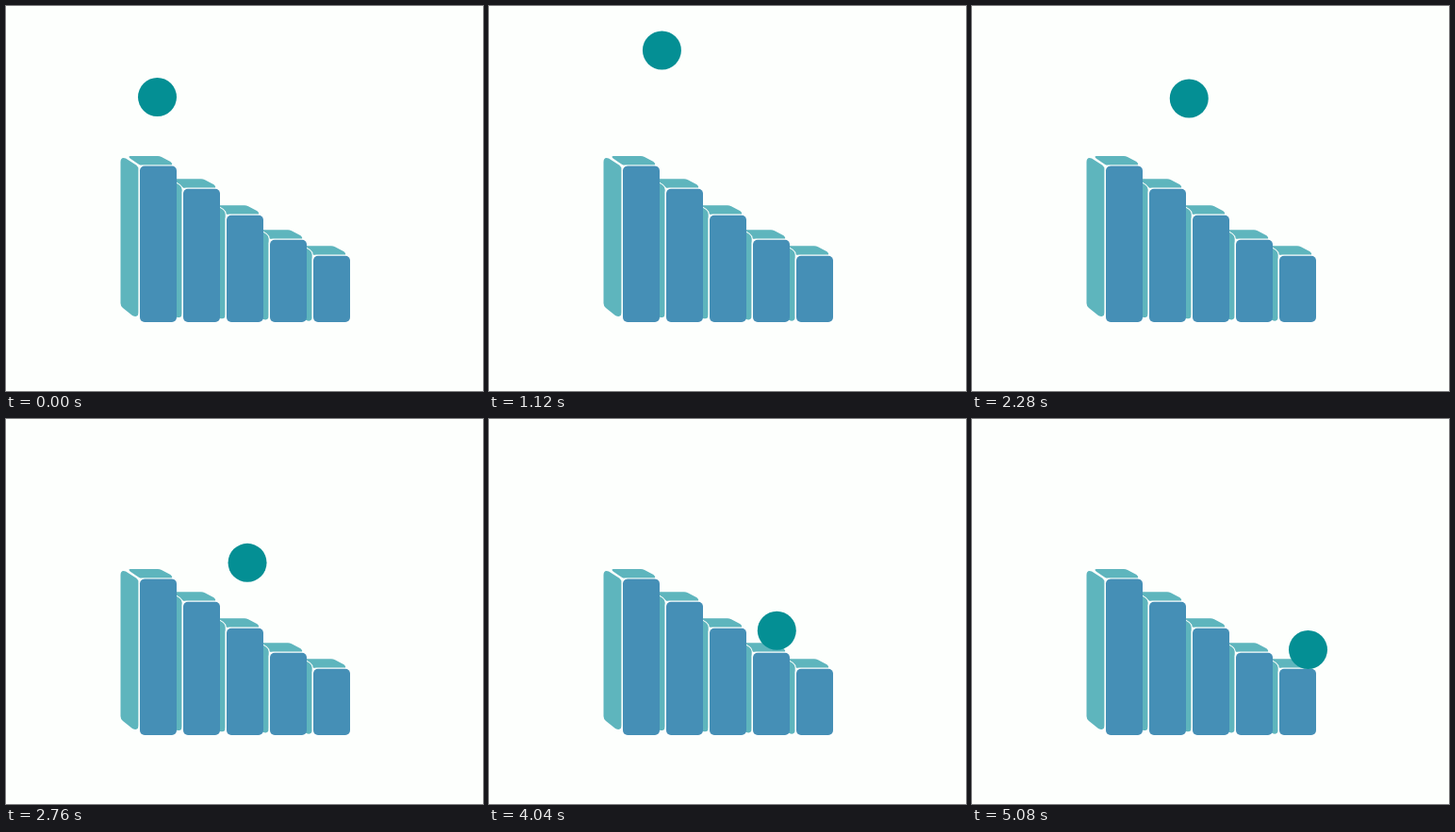
These frames come from a looping animation (506 by 408 pixels, 5.12 s). An HTML page:

```html
<!DOCTYPE html>
<html lang="en">
<head>
<meta charset="utf-8">
<title>Bouncing ball on bars</title>
<style>
  html, body { margin: 0; width: 100%; height: 100%; overflow: hidden; background: #fdfffd; }
  svg { display: block; width: 506px; height: 408px; }
  .paper { fill: #fdfffd; }
  .front { fill: #458fb6; }
  .top { fill: #5eb5bd; }
  .side { fill: #5eb5bd; stroke: #fdfffd; stroke-width: 2; paint-order: stroke; }
  .ball { fill: #048f94; }
</style>
</head>
<body>
<svg viewBox="0 0 506 408">
  <g id="bars"></g>
  <circle id="ball" class="ball" r="20.5"/>
</svg>
<script>
const LOOP = 5120, STEP = 40, BASE = 335;
const barTops = [169.6, 193.8, 221.8, 247.8, 264.8];

function barMarkup(y, i) {
  const x = 142 + i * 46;
  const shoulder = y - Math.min(3 * i, 5);
  const foot = 329 + 1.2 * i;
  const top = `M${x - 8} ${y - 10.6}H${x + 19}q2 0 4 1l9.500 5q3.500 3.600 0 3.800H${x + 3}
    q-3 0 -5 -1.500l-8 -5.500q-3 -2.500 0 -2.800Z`;
  const side = `M${x - 20.5} ${shoulder - 4}q0 -6 5.500 -4l11 7q2.700 2 2.700 5
    V${foot - 5}q0 7 -6.700 4l-10 -8q-2.500 -2 -2.500 -5Z`;
  const box = `width="39" height="${BASE - y}" rx="5"`;
  return `<path class="top" d="${top}"/><path class="side" d="${side}"/>
    <rect class="paper" x="${x - 1.4}" y="${y - 1.2}" ${box}/>
    <rect class="front" x="${x}" y="${y}" ${box}/>`;
}
document.getElementById("bars").innerHTML = barTops.map(barMarkup).reverse().join("");

// Landings and peaks of the ball centre
const keys = [
  { t: 0, x: 160.5, y: 96.5 },
  { t: 560, x: 160.5, y: 148.5 },
  { t: 640, x: 160.5, y: 148.5 },
  { t: 1262, x: 190.2, y: 29.5 },
  { t: 1940, x: 207.2, y: 172 },
  { t: 2372, x: 236.5, y: 86.5 },
  { t: 2958, x: 266, y: 199 },
  { t: 3550, x: 293.2, y: 149.5 },
  { t: 4036, x: 305, y: 224.5 },
  { t: 4610, x: 348, y: 190.5 },
  { t: 5060, x: 356.5, y: 244.5 }
];

const fall = u => u ** 1.3;
const rise = u => 1 - fall(1 - u);

function position(t) {
  const next = Math.max(1, keys.findIndex(key => key.t >= t));
  if (t >= keys.at(-1).t) return keys.at(-1);
  const a = keys[next - 1], b = keys[next];
  const u = (t - a.t) / (b.t - a.t);
  const ease = b.y > a.y ? fall : rise;
  return { x: a.x + (b.x - a.x) * u, y: a.y + (b.y - a.y) * ease(u) };
}

const ball = document.getElementById("ball");
const start = performance.now();

function draw(now) {
  const elapsed = Math.max(0, now - start) % LOOP;
  const { x, y } = position(Math.floor(elapsed / STEP) * STEP);
  ball.setAttribute("cx", x.toFixed(2));
  ball.setAttribute("cy", y.toFixed(2));
  requestAnimationFrame(draw);
}
draw(start);
</script>
</body>
</html>
```
